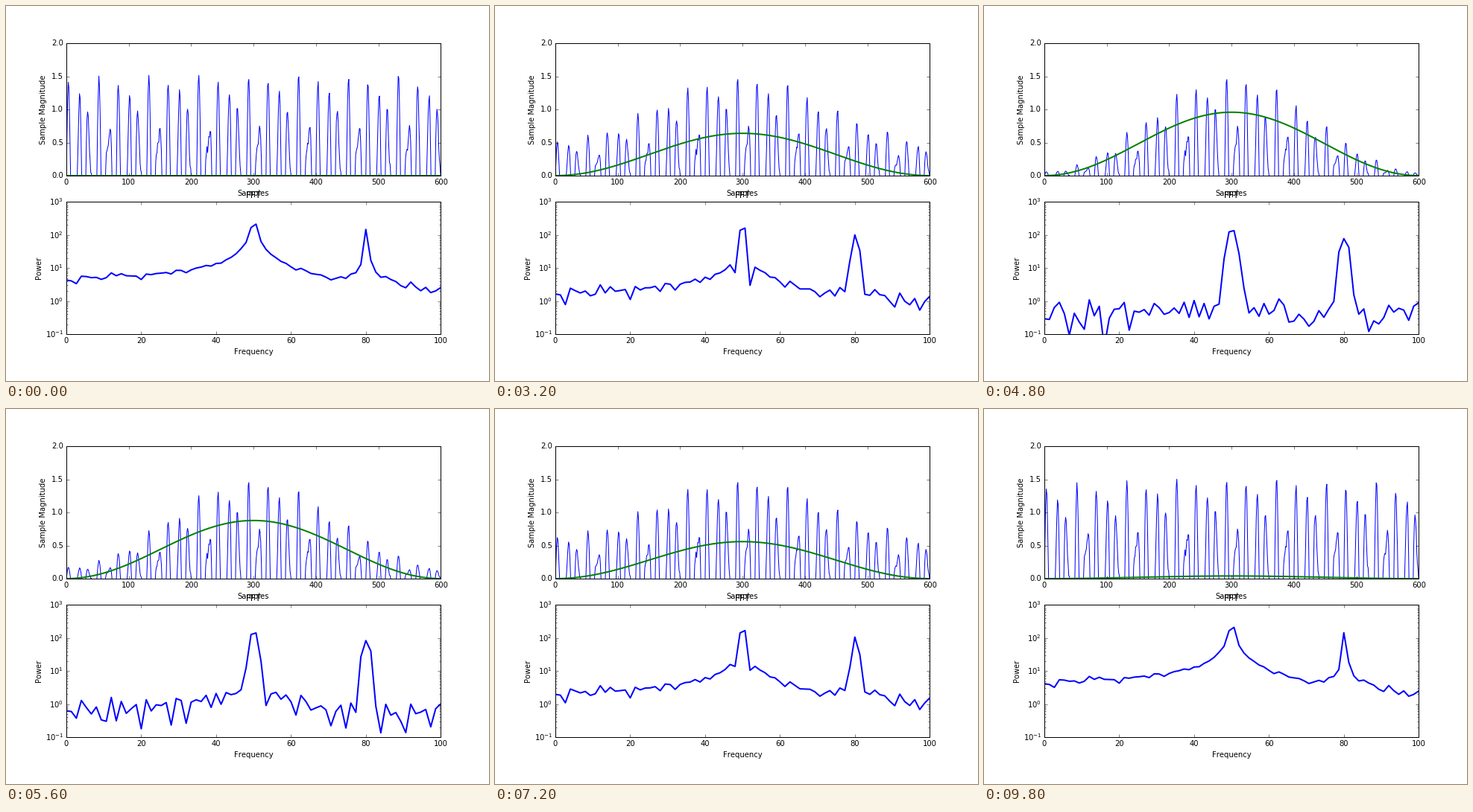
Recreate the animation shown at these times as a matplotlib script. Size 648x504 px, loop 10 s.

```python
import numpy as np
import matplotlib.pyplot as plt
from matplotlib.animation import FuncAnimation

plt.rcParams.update({
    "figure.dpi": 72, "figure.facecolor": "white",
    "figure.subplot.left": 0.125, "figure.subplot.right": 0.9,
    "figure.subplot.bottom": 0.125, "figure.subplot.top": 0.9,
    "figure.subplot.hspace": 0.2,
    "font.family": "DejaVu Sans", "font.size": 10,
    "mathtext.fontset": "dejavusans", "mathtext.default": "regular",
    "text.hinting": "auto", "text.kerning_factor": 6,
    "axes.linewidth": 1.0, "axes.axisbelow": False,
    "axes.labelpad": 5, "axes.titlepad": 5, "axes.titley": 1.0,
    "axes.titlesize": 12, "ytick.alignment": "center",
})
for side in ("xtick", "ytick"):
    plt.rcParams.update({
        f"{side}.direction": "in",
        f"{side}.major.size": 4, f"{side}.minor.size": 2,
        f"{side}.major.width": 0.5, f"{side}.minor.width": 0.5,
        f"{side}.major.pad": 4, f"{side}.minor.pad": 4,
    })
plt.rcParams["xtick.top"] = plt.rcParams["ytick.right"] = True

FRAMES, INTERVAL = 50, 200
N, RATE = 600, 800
NOISE = 0.035

# Two tones, at 50 and 80 Hz, with a little noise.
t = np.linspace(0, N / RATE, N)
samples = np.sin(50 * 2 * np.pi * t) + 0.5 * np.sin(80 * 2 * np.pi * t)
samples += np.random.default_rng(5).normal(0, NOISE, N)
hann = np.hanning(N)

index = np.linspace(0, N, N)
freq = np.fft.rfftfreq(N, 1 / RATE)

fig, (top, low) = plt.subplots(2, 1, figsize=(9, 7))
pulses, = top.plot([], [], color="b", lw=1)
window, = top.plot([], [], color="g", lw=2)
top.set(xlim=(0, N), ylim=(0, 2), xlabel="Samples")
top.set_ylabel("Sample Magnitude", labelpad=6)
top.set_yticks([0, 0.5, 1, 1.5, 2])

power, = low.plot([], [], color="b", lw=2)
low.set_yscale("log")
low.set(xlim=(0, 100), ylim=(0.1, 1000), xlabel="Frequency", title="FFT")
low.set_ylabel("Power", labelpad=3.5)


def draw(i):
    """Fade the Hann window in over half the loop, then out again."""
    a = 1 - abs(2 * i / FRAMES - 1)
    shaped = samples * (1 - a + a * hann)
    pulses.set_data(index, shaped)
    window.set_data(index, a * hann)
    power.set_data(freq, np.abs(np.fft.rfft(shaped)))
    return pulses, window, power


anim = FuncAnimation(fig, draw, frames=FRAMES, interval=INTERVAL,
                     init_func=lambda: draw(0), repeat=True, repeat_delay=0)
plt.show()
```
